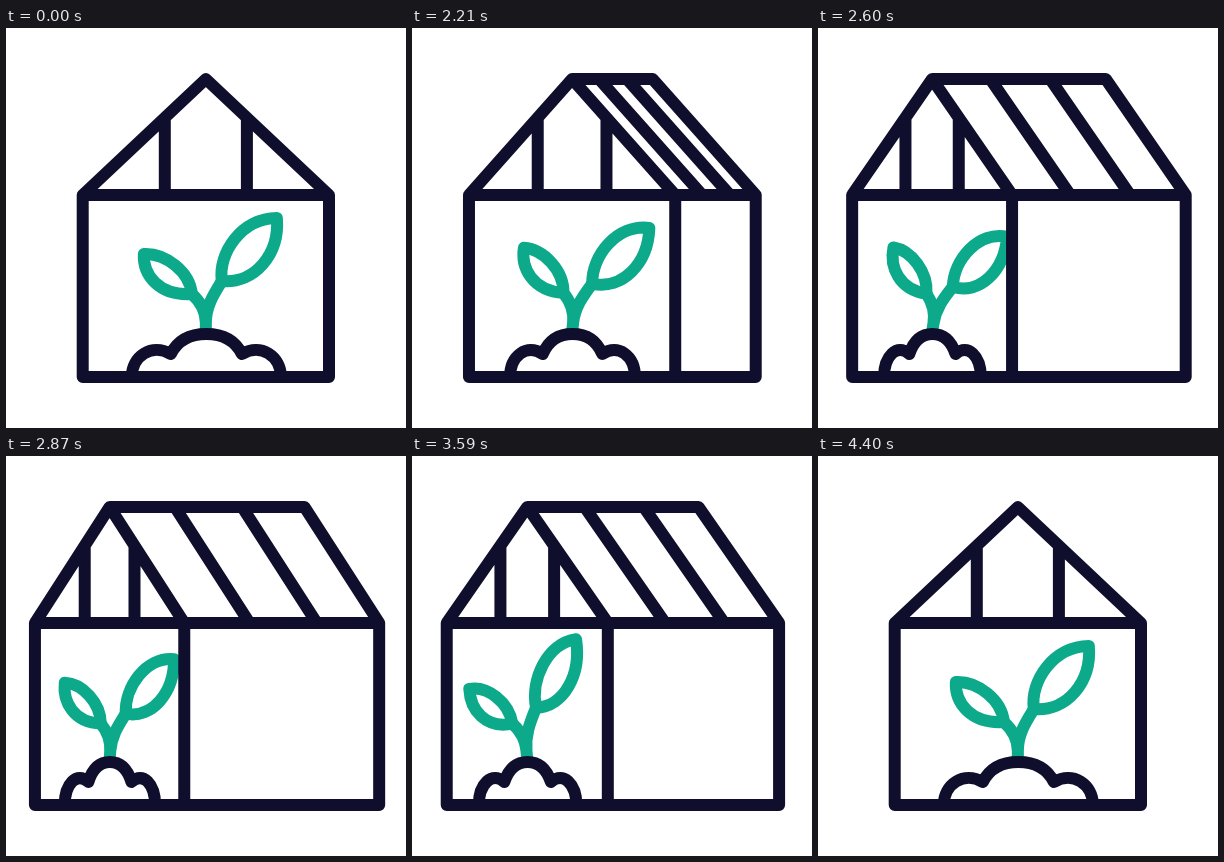
These frames come from a looping animation (400 px wide and 400 px high, 4.43 s). An HTML page:

```html
<!DOCTYPE html>
<html lang="en">
<head>
<meta charset="utf-8">
<title>Greenhouse</title>
<style>
  html, body { margin: 0; height: 100%; overflow: hidden; background: #fff; }
  svg { display: block; width: 100%; height: 100%; }
  path { fill: none; stroke: #0f0f2d; stroke-width: 12; stroke-linejoin: round; vector-effect: non-scaling-stroke; }
  #plant path { stroke: #0ca98b; }
  #soil path { fill: #fff; }
</style>
</head>
<body>
<svg viewBox="0 0 400 400">
  <!-- plant coordinates are relative to the foot of the stem -->
  <g id="plant">
    <path d="M0 10V-9C0 -19 -4 -29 -14 -38M0 -9C0 -26 8 -38 16 -51"/>
    <path d="M-14 -38C-16 -60 -40 -79 -62 -78C-63 -57 -47 -36 -14 -38Z"/>
    <path d="M16 -51C12 -79 36 -114 71 -114C74 -78 49 -48 16 -51Z"/>
  </g>
  <g id="soil">
    <path d="M-74 349C-74 328 -54 315 -35 326C-28 312 -15 306 .5 306C16 306 29 312 36 326C55 315 75 328 75 349"/>
  </g>
  <path id="house"/>
</svg>
<script>
const LOOP = 4430, START = 2000, TURN = 3200, END = 4400;
const EAVES = 167, RIDGE = 51, FLOOR = 349, STEM = 304;
const [plant, soil, house] = ['plant', 'soil', 'house'].map(id => document.getElementById(id));

// Cubic easing with flat ends; x1 and x2 are the handle times.
const ease = (x1, x2) => t => {
  if (t <= 0 || t >= 1) return t <= 0 ? 0 : 1;
  let lo = 0, hi = 1;
  for (let i = 0; i < 24; i++) {
    const u = (lo + hi) / 2, v = 1 - u;
    if (3 * u * v * v * x1 + 3 * u * u * v * x2 + u * u * u < t) lo = u; else hi = u;
  }
  return lo * lo * (3 - 2 * lo);
};
const open = ease(.167, .08), close = ease(.61, .4), soft = ease(1 / 3, 2 / 3);

// Rises from a to b and falls back from b to c.
const bump = (t, a, b, c, rise = soft, fall = soft) => rise((t - a) / (b - a)) - fall((t - b) / (c - b));

function draw(t) {
  const turn = bump(t, START, TURN, END, open, close);
  const sway = 12.5 * bump(t, START, 2400, TURN) - 6 * bump(t, TURN, 3600, END);
  const dip = bump(t, START, TURN, 3600);

  const left = 76.7 - 49.5 * turn, corner = 323 - 150 * turn, right = 323 + 52 * turn;
  const apex = (left + corner) / 2, depth = right - corner;
  const post = 41 * (corner - left) / 246;

  let d = `M${left} ${EAVES}L${apex} ${RIDGE}H${apex + depth}L${right} ${EAVES}V${FLOOR}H${left}V${EAVES}H${right}`;
  d += `M${corner} ${EAVES}V${FLOOR}`;
  for (const x of [apex - post, apex + post]) d += `M${x} 90V${EAVES}`;
  for (const share of [0, .335, .68]) {
    const shift = depth * share;
    d += `M${apex + shift} ${RIDGE}L${corner + shift} ${EAVES}`;
  }
  house.setAttribute('d', d);

  soil.setAttribute('transform', `translate(${apex}) scale(${(corner - left) / 246} 1)`);
  plant.setAttribute('transform',
    `translate(${apex} ${STEM}) scale(${1 - .2 * turn} ${1 - .08 * dip}) rotate(${sway})`);
}

const begin = performance.now();
function tick() {
  draw((performance.now() - begin) % LOOP);
  requestAnimationFrame(tick);
}
tick();
</script>
</body>
</html>
```
